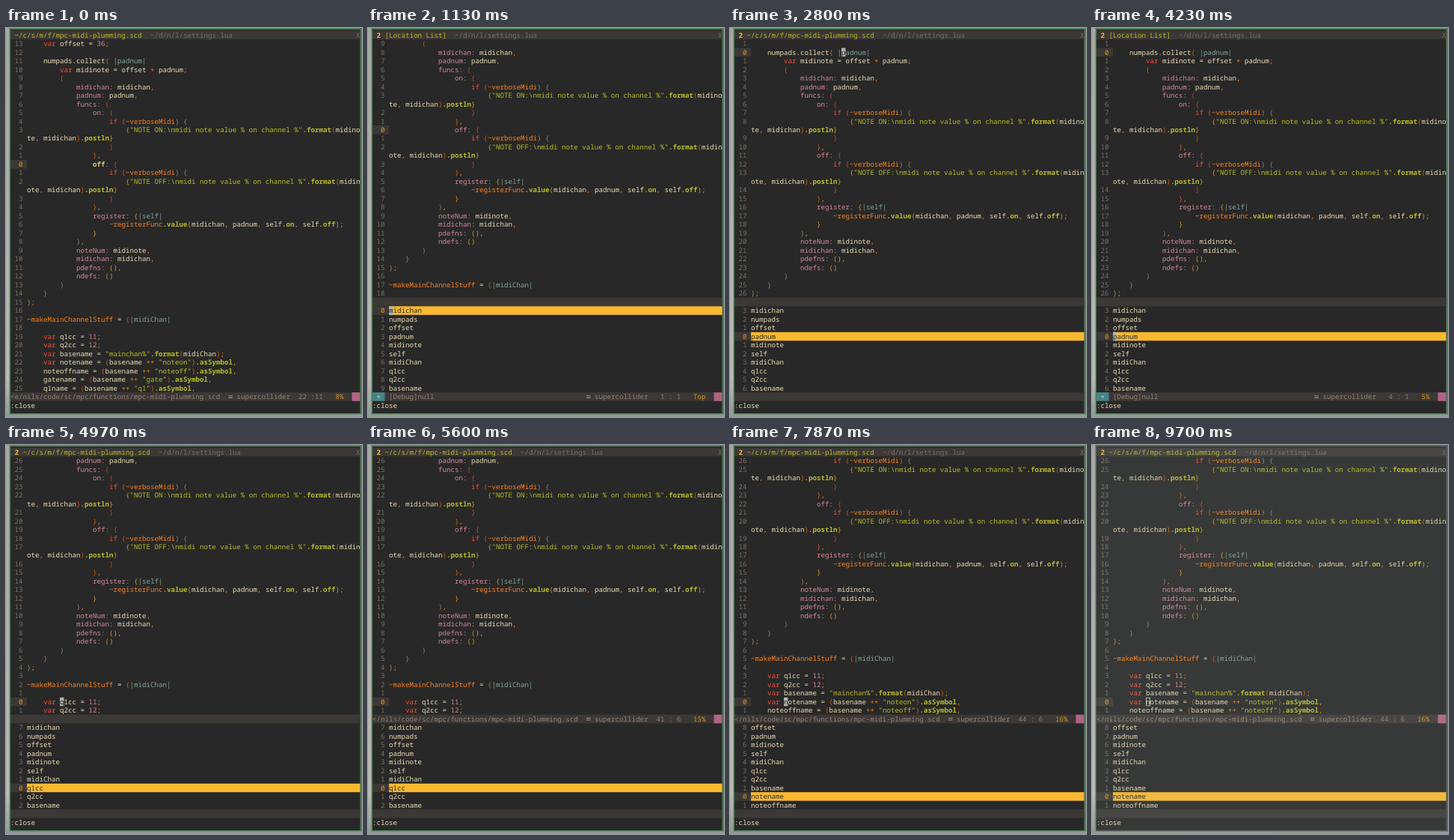
Recreate the animation shown at these times as an HTML page with a canvas. Size 476x519 px, loop 9.81 s.

```html
<!DOCTYPE html>
<html lang="en">
<head>
<meta charset="utf-8">
<title>Location list in a terminal editor</title>
<style>
html, body { margin: 0; width: 100%; height: 100%; overflow: hidden; background: #a9ada7; }
canvas { display: block; }
</style>
</head>
<body>
<canvas id="stage" width="476" height="519"></canvas>
<script>
const ctx = document.getElementById('stage').getContext('2d');
const LOOP = 9810;
const CW = 5.5, RH = 11.49, LEFT = 6, TOP = 3.6, COLS = 85, GUTTER = 4, WRAP = COLS - GUTTER;
const FACE = '"Noto Sans Mono", "DejaVu Sans Mono", monospace';
const FG = '#ebdbb2', BG = '#282828', BAR = '#3c3836', DIM = '#7c6f64', MUTED = '#928374';
const RED = '#fb4934', GREEN = '#b8bb26', YELLOW = '#fabd2f', GOLD = '#d79921', ORANGE = '#fe8019';
const PINK = '#d3869b', BLUE = '#83a598', MARK = '#fab92f', BLOCK = '#b4b2ac';
const BRACKET = { r: '#c4482f', o: '#d65d0e', y: GOLD, g: '#928374' };

// Each line: text, then one letter per bracket for its colour.
const FIRST = 9;
const code = [
  ['    var offset = 36;'],
  [''],
  ['    numpads.collect{ |padnum|', 'o'],
  ['        var midinote = offset + padnum;'],
  ['        (', 'o'],
  ['            midichan: midichan,'],
  ['            padnum: padnum,'],
  ['            funcs: (', 'r'],
  ['                on: {', 'r'],
  ['                    if (~verboseMidi) {', 'ogg'],
  ['                        {"NOTE ON:\\nmidi note value % on channel %".format(midinote, midichan).postln}', 'yooy'],
  ['                    }', 'r'],
  ['                },', 'o'],
  ['                off: {', 'r'],
  ['                    if (~verboseMidi) {', 'ogg'],
  ['                        {"NOTE OFF:\\nmidi note value % on channel %".format(midinote, midichan).postln}', 'yooy'],
  ['                    }', 'r'],
  ['                },', 'o'],
  ['                register: {|self|', 'y'],
  ['                    ~registerFunc.value(midichan, padnum, self.on, self.off);', 'yy'],
  ['                }', 'y'],
  ['            ),', 'g'],
  ['            noteNum: midinote,'],
  ['            midichan: midichan,'],
  ['            pdefns: (),', 'yy'],
  ['            ndefs: ()', 'yy'],
  ['        )', 'g'],
  ['    }', 'g'],
  ['};', 'g'],
  [''],
  ['~makeMainChannelStuff = {|midiChan|', 'o'],
  [''],
  ['    var q1cc = 11;'],
  ['    var q2cc = 12;'],
  ['    var basename = "mainchan%".format(midiChan);', 'oo'],
  ['    var notename = (basename ++ "noteon").asSymbol,', 'oo'],
  ['    noteoffname = (basename ++ "noteoff").asSymbol,', 'oo'],
  ['    gatename = (basename ++ "gate").asSymbol,', 'oo'],
  ['    q1name = (basename ++ "q1").asSymbol,', 'oo']
];
const names = ('midichan numpads offset padnum midinote self midiChan ' +
  'q1cc q2cc basename notename noteoffname').split(' ');
const PATH = '/home/nils/code/sc/mpc/functions/mpc-midi-plumming.scd';
const TOKEN = /"[^"]*"|\|\w+\||~\w+|\.\w+|\w+:|\w+|[(){}]|./g;

// sel < 0: the list is closed. bar: whether the status line is drawn yet.
const steps = [
  [0, { top: 9, line: 22, col: 22, sel: -1, list: false, on: false, bar: true, keys: '', fade: 0 }],
  [500, { on: true, keys: ',' }],
  [1130, { top: 13, sel: 0, list: true, keys: '' }],
  [1570, { sel: 1 }],
  [2070, { on: false }],
  [2200, { sel: 2, on: true }],
  [2530, { sel: 3 }],
  [2800, { top: 10, line: 11, col: 22, list: false, bar: false }],
  [2830, { bar: true }],
  [3470, { on: false }],
  [3930, { on: true, keys: '^W' }],
  [4200, { list: true, bar: false, keys: '' }],
  [4230, { bar: true }],
  [4370, { sel: 4 }],
  [4520, { sel: 5 }],
  [4670, { sel: 6 }],
  [4820, { sel: 7 }],
  [4970, { top: 15, line: 41, col: 8, list: false, bar: false }],
  [5000, { bar: true }],
  [5600, { on: false }],
  [6100, { on: true }],
  [6430, { keys: '^W' }],
  [6570, { list: true, bar: false, keys: '' }],
  [6600, { bar: true }],
  [6800, { sel: 8 }],
  [6970, { sel: 9 }],
  [7400, { sel: 10 }],
  [7800, { top: 18, line: 44, col: 8, list: false, bar: false }],
  [7830, { bar: true }],
  [8470, { on: false }],
  [9000, { on: true }],
  [9430, { fade: 1 }],
  [9500, { fade: 2 }],
  [9570, { fade: 3 }],
  [9630, { fade: 4 }],
  [9700, { fade: 5 }]
];

const px = col => LEFT + col * CW;
const py = row => TOP + row * RH;

function cells(col, row, n, color) {
  ctx.fillStyle = color;
  ctx.fillRect(px(col), py(row), n * CW, RH);
}

function text(str, col, row, color, bold) {
  ctx.font = (bold ? 'bold ' : '') + '9.17px ' + FACE;
  ctx.fillStyle = color;
  ctx.fillText(str, px(col), py(row) + 9);
}

function number(rel, row) {
  if (!rel) cells(0, row, GUTTER, BAR);
  text(String(Math.abs(rel)).padStart(3), 0, row, rel ? DIM : GOLD);
}

function style(tok) {
  if (tok[0] === '"') return [GREEN];
  if (tok[0] === '|') return [BLUE];
  if (tok[0] === '~') return [ORANGE];
  if (/^\.\w/.test(tok) && tok !== '.collect') return [GREEN, true];
  if (/^\w+:$/.test(tok)) return [PINK];
  if (/^(var|if)$/.test(tok)) return [RED];
  if (/^\d+$/.test(tok)) return [PINK];
  if (/^[,;+]$/.test(tok)) return [ORANGE];
  return [FG];
}

function codeLine([str, marks = ''], row, fresh) {
  let n = 0;
  for (const m of str.matchAll(TOKEN)) {
    let tok = m[0], at = m.index;
    if (tok === ' ') continue;
    let [color, bold] = style(tok);
    if (/[(){}]/.test(tok)) color = BRACKET[marks[n++]];
    if (fresh && tok === 'off:') {
      text('off', GUTTER + at, row, '#d8cc70', true);
      tok = ':';
      at += 3;
    }
    const room = WRAP - at;
    if (room <= 0) text(tok, GUTTER - room, row + 1, color, bold);
    else {
      text(tok.slice(0, room), GUTTER + at, row, color, bold);
      if (tok.length > room) text(tok.slice(room), GUTTER, row + 1, color, bold);
    }
  }
}

function cursor(col, row, ch, hollow) {
  if (hollow) {
    ctx.strokeStyle = BLOCK;
    ctx.strokeRect(px(col) + .5, py(row) + .5, CW - .5, RH - 1);
    return;
  }
  cells(col, row, 1, BLOCK);
  text(ch, col, row, BG);
}

function keyboard(col, row) {
  const x = px(col), y = py(row);
  ctx.fillStyle = MUTED;
  ctx.fillRect(x, y + 4, 5.5, 1.2);
  ctx.fillRect(x, y + 6.6, 5.5, 1.2);
  ctx.fillRect(x + .8, y + 5.2, .7, 1.4);
  ctx.fillRect(x + 4, y + 5.2, .7, 1.4);
}

function status(row, line, col, pct, left) {
  const pos = 'supercollider ' + String(line).padStart(3) + ' :' + String(col).padStart(2);
  const pctCol = COLS - 4 - pct.length, posCol = pctCol - 3 - pos.length;
  text(pos, posCol, row, MUTED);
  keyboard(posCol - 2, row);
  text(pct, pctCol, row, GOLD);
  cells(COLS - 2, row, 2, '#b16286');
  left(posCol - 4);
}

function mainPane(s) {
  const open = s.sel >= 0, end = open ? 31 : 42;
  const indent = code[s.line - FIRST][0].search(/\S/);
  for (let row = 1, n = s.top; row < end; row++, n++) {
    const entry = code[n - FIRST];
    number(n - s.line, row);
    codeLine(entry, row, !open && n === 22);
    if (n === s.line && s.on && !s.list)
      cursor(GUTTER + s.col, row, entry[0][s.col] || ' ', s.fade);
    if (entry[0].length > WRAP) row++;
  }
  cells(0, end, COLS, BAR);
  if (!s.list && s.bar)
    status(end, s.line, s.col - indent * 3 / 4 + 1, Math.round(s.line / 2.75) + '%',
      room => text('<' + PATH.slice(1 - room), 0, end, MUTED));
}

function listPane(s) {
  const first = Math.max(0, s.sel - 8);
  for (let i = 0; i < 10; i++) {
    const n = first + i, row = 32 + i, current = n === s.sel;
    number(n - s.sel, row);
    if (current) cells(GUTTER, row, WRAP, MARK);
    text(names[n], GUTTER, row, current ? BG : FG);
    if (current && s.list && s.on) cursor(GUTTER, row, names[n][0]);
  }
  cells(0, 42, COLS, BAR);
  if (!s.list || !s.bar) return;
  const pct = s.sel ? Math.floor((s.sel + 1) / .8) + '%' : 'Top';
  status(42, s.sel + 1, 1, pct, () => {
    cells(0, 42, 3, '#458588');
    ctx.fillStyle = '#8fb5b0';
    ctx.beginPath();
    ctx.arc(px(1.5), py(42.5), 1.8, 0, 7);
    ctx.fill();
    text('[Debug]null', GUTTER, 42, MUTED);
  });
}

function tabs(s) {
  const label = s.list ? '[Location List]' : '~/c/s/m/f/mpc-midi-plumming.scd';
  let col = 1;
  cells(0, 0, COLS, BAR);
  if (s.sel >= 0) {
    text('2', col, 0, YELLOW, true);
    col += 2;
  }
  text(label, col, 0, GREEN);
  text('~/d/n/l/settings.lua', col + label.length + 2, 0, DIM);
  text('X', COLS - 1, 0, DIM);
}

function wallpaper() {
  const g = ctx.createLinearGradient(0, 0, 0, 519);
  g.addColorStop(0, '#a3a8a1');
  g.addColorStop(.9, '#b9bbb5');
  g.addColorStop(1, '#8d9b95');
  ctx.fillStyle = g;
  ctx.fillRect(0, 0, 476, 519);
}

function draw(s) {
  wallpaper();
  ctx.fillStyle = s.fade ? '#58645b' : '#4f7f56';
  ctx.fillRect(4.5, 0, 471.5, 515.5);
  ctx.fillStyle = BG;
  ctx.fillRect(6, 2, 467.5, 512);
  tabs(s);
  mainPane(s);
  if (s.sel >= 0) listPane(s);
  text(':close', 0, 43, FG);
  text(s.keys, COLS - 11, 43, FG);
  if (s.fade) {
    ctx.globalAlpha = s.fade * .022;
    ctx.fillStyle = '#b0c0b6';
    ctx.fillRect(6, 2, 467.5, 512);
    ctx.globalAlpha = 1;
  }
}

ctx.textRendering = 'geometricPrecision';
const start = performance.now();
let shown = -1;
function tick(now) {
  const t = Math.max(0, now - start) % LOOP;
  const count = steps.filter(step => step[0] <= t).length;
  if (count !== shown) {
    shown = count;
    draw(Object.assign({}, ...steps.slice(0, count).map(step => step[1])));
  }
  requestAnimationFrame(tick);
}
tick(start);
</script>
</body>
</html>
```
